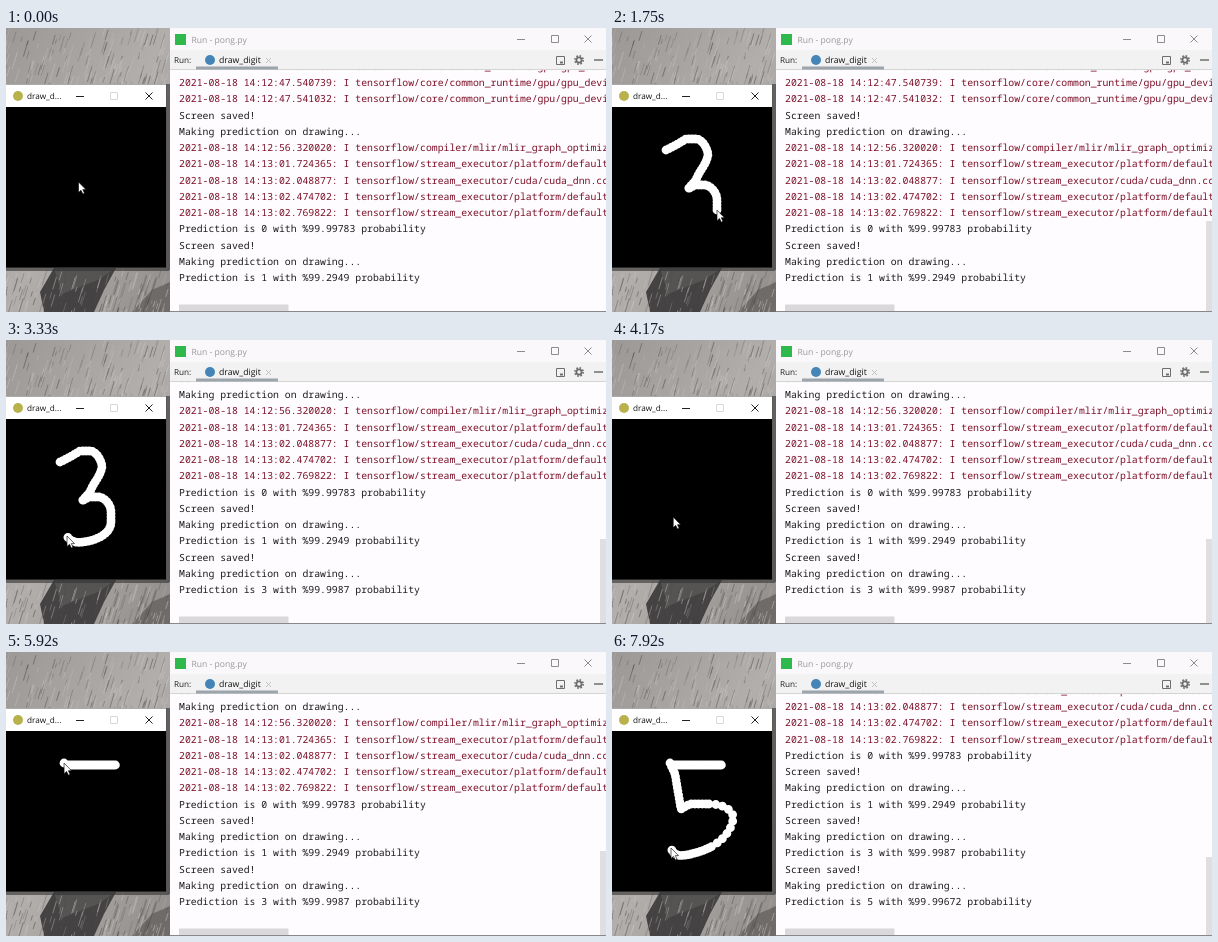
An HTML page for the animation above (8 s loop, 600 px wide and 284 px high).

```html
<!DOCTYPE html>
<html lang="en">
<head>
<meta charset="utf-8">
<title>Digit drawing demo</title>
<style>
  html, body { margin: 0; width: 100%; height: 100%; overflow: hidden; background: #fff; }
  svg { display: block; width: 100vw; height: 100vh; text-rendering: geometricPrecision; }
  text { font-family: "Open Sans", sans-serif; white-space: pre; }
  #log text { font: 500 9.8px "Noto Sans Mono", monospace; fill: #1c1c1c; }
  #log .warn { fill: #7c1028; }
  .line { fill: none; stroke: #222; }
</style>
</head>
<body>
<svg viewBox="0 0 600 284">
  <defs>
    <linearGradient id="rock" x2="1" y2="1">
      <stop offset="0" stop-color="#9c9896"/>
      <stop offset=".5" stop-color="#b2aeab"/>
      <stop offset="1" stop-color="#8f8c8a"/>
    </linearGradient>
    <clipPath id="console"><rect x="164" y="42" width="436" height="216"/></clipPath>
    <clipPath id="board"><rect y="79" width="160" height="160"/></clipPath>
  </defs>

  <!-- desktop -->
  <rect width="165" height="284" fill="url(#rock)"/>
  <path d="M38 284L34 264L48 240H110L98 262L88 284Z" fill="#444242"/>
  <path d="M48 240H110L92 252L56 266Z" fill="#565453"/>
  <path d="M126 284L146 262L164 254V284Z" fill="#6e6b69"/>
  <g id="streaks" stroke-width="1"></g>
  <path d="M0 240H163V243H0ZM160 56H164V242H160Z" fill="#333" opacity=".6"/>

  <!-- drawing window -->
  <rect y="56" width="160.500" height="184" fill="#555"/>
  <rect y="56.500" width="160" height="23" fill="#fff"/>
  <rect y="79" width="160" height="160.500" fill="#000"/>
  <circle cx="12" cy="68" r="5" fill="#b9b24c"/>
  <text x="21" y="71" font-size="8.200" fill="#111">draw_d...</text>
  <path class="line" d="M70 68.500H78M139.500 64.500L146.500 71.500M146.500 64.500L139.500 71.500"/>
  <path class="line" d="M104.500 64.500H111.500V71.500H104.500Z" style="stroke:#d8d8d8"/>
  <g clip-path="url(#board)">
    <path id="ink" fill="none" stroke="#fff" stroke-width="8.800" stroke-linecap="round"/>
  </g>

  <!-- run window -->
  <rect x="164" width="436" height="284" fill="#fefcfe"/>
  <rect x="164" width="436" height="22" fill="#faf8fa"/>
  <rect x="164" y="22" width="436" height="19" fill="#f2f2f2"/>
  <path d="M164 41.500H600" stroke="#d4d4d4"/>
  <path d="M164 283.500H600" stroke="#888"/>
  <rect x="169" y="6" width="11" height="11" fill="#2fb84c"/>
  <text x="185.500" y="14.500" font-size="8.600" fill="#999">Run - pong.py</text>
  <path class="line" d="M511 11.500H519M545.500 7.500H552.500V14.500H545.500ZM578.500 7.500L585.500 14.500M585.500 7.500L578.500 14.500" style="stroke:#8c8c8c"/>
  <text x="168" y="35" font-size="8.200" fill="#222">Run:</text>
  <circle cx="204" cy="32" r="5" fill="#4584b6"/>
  <text x="213" y="35" font-size="8.700" fill="#111">draw_digit</text>
  <path class="line" d="M260 30L265 35M265 30L260 35" style="stroke:#c0c0c0"/>
  <rect x="190" y="38.500" width="82" height="3" fill="#9ca4ac"/>
  <g fill="none" stroke="#6e6e6e">
    <path d="M550.500 28.500H558.500V36.500H550.500Z"/>
    <path d="M554 34.500H557" stroke-width="2"/>
    <circle cx="573" cy="32" r="2.600" stroke-width="1.800"/>
    <circle cx="573" cy="32" r="4.200" stroke-dasharray="1.700 1.600" stroke-width="1.500"/>
    <path d="M588 32H597" stroke-width="1.500"/>
  </g>
  <g clip-path="url(#console)"><g id="log"></g></g>
  <rect x="173" y="276.500" width="109.500" height="6.500" fill="#dad8da"/>
  <rect id="thumb" x="594" width="6" fill="#e0dee0"/>

  <path id="pointer" d="M0 0V10.500L2.500 8.300L4.300 12L6 11.200L4.300 7.600H7.500Z" fill="#fff" stroke="#000" stroke-width=".6"/>
</svg>
<script>
const LOOP = 8000, LINE = 16.25, LAST_BASELINE = 253, TICK = 24, CLEAR_AT = 3670, THUMB_AT = 900;
const $ = id => document.getElementById(id);

function add(parent, tag, attrs, text = '') {
  const el = document.createElementNS('http://www.w3.org/2000/svg', tag);
  for (const key in attrs) el.setAttribute(key, attrs[key]);
  el.textContent = text;
  parent.append(el);
  return el;
}

// Console output; a leading "!" marks a warning line.
const device = 'core/common_runtime/gpu/gpu_device.cc';
const loader = 'stream_executor/platform/default/dso_loader.cc';
const warn = (time, file) => `!2021-08-18 14:${time}: I tensorflow/${file}`;
const result = (digit, score) =>
  ['Screen saved!', 'Making prediction on drawing...', `Prediction is ${digit} with %${score} probability`];
const lines = [
  warn('12:47.540439', device),
  warn('12:47.540739', device),
  warn('12:47.541032', device),
  'Screen saved!',
  'Making prediction on drawing...',
  warn('12:56.320020', 'compiler/mlir/mlir_graph_optimization_pass.cc'),
  warn('13:01.724365', loader),
  warn('13:02.048877', 'stream_executor/cuda/cuda_dnn.cc'),
  warn('13:02.474702', loader),
  warn('13:02.769822', loader),
  result(0, '99.99783')[2],
  ...result(1, '99.2949'),
  ...result(3, '99.9987'),
  ...result(5, '99.99672')
];
const START_LINES = 14;
lines.forEach((line, i) => {
  const isWarning = line[0] === '!';
  add($('log'), 'text', {
    x: 173, y: LAST_BASELINE + (i - START_LINES + 1) * LINE, class: isWarning ? 'warn' : 'out'
  }, isWarning ? line.slice(1) : line);
});

// [time, lines printed since the start]
const prints = [[0, 0], [2750, 2], [2920, 3], [7580, 5], [7750, 6]];

// Rock texture: steep seeded streaks above and below the drawing window.
let seed = 7;
const random = () => (seed = seed * 16807 % 2147483647) / 2147483647;
for (let i = 0; i < 320; i++) {
  const top = i % 2 ? 0 : 240, height = i % 2 ? 56 : 44;
  const x = random() * 170 - 5, y = top + random() * height, len = 4 + random() * 14;
  add($('streaks'), 'path', {
    d: `M${x} ${y}l${-len * .3} ${len}`,
    stroke: random() < .5 ? '#4e4b4a' : '#cbc7c4',
    opacity: .2 + random() * .35
  });
}

// Pointer travel: [from, to, path, pen down]
const moves = [
  [80, 680, 'M72.500 154L54 122', 0],
  [680, 1750, 'M54 122L64 117L74 111H85C90 112 95 119 96 126C95 136 87 143 84 152L76 161L83 157H94C100 159 105 165 105 172V182', 1],
  [1750, 2170, 'M105 182C105 193 92 199 83 201C74 203 66 204 61 196', 1],
  [4000, 4750, 'M61 196L62 113', 0],
  [4830, 5500, 'M62 113L111 113', 1],
  [5580, 5920, 'M111 113L58 110', 0],
  [5920, 6420, 'M58 111L63 122L69 157L78 152L97 152', 1],
  [6420, 6670, 'M97 152C112 152 123 159 121 168C118 182 108 190 97 196', 1],
  [6670, 7000, 'M97 196C88 200 72 205 66 203C62 202 60 199 59 196', 1]
].map(([from, to, d, down]) => {
  const path = document.createElementNS('http://www.w3.org/2000/svg', 'path');
  path.setAttribute('d', d);
  const length = path.getTotalLength();
  const at = t => path.getPointAtLength(length * Math.min(1, Math.max(0, (t - from) / (to - from))));
  return { from, to, down, at };
});

// The pen leaves one round dot per tick.
const dots = [];
for (const { from, to, down, at } of moves) {
  for (let t = from; down && t <= to; t += TICK) {
    const p = at(t);
    dots.push({ t, d: `M${p.x.toFixed(1)} ${p.y.toFixed(1)}h.01` });
  }
}

const latest = (list, test) => list.filter(test).pop();

function render(t) {
  const p = (latest(moves, m => m.from <= t) || moves[0]).at(t);
  $('pointer').setAttribute('transform', `translate(${p.x} ${p.y})`);

  const since = t < CLEAR_AT ? 0 : CLEAR_AT;
  $('ink').setAttribute('d', dots.filter(dot => dot.t >= since && dot.t <= t).map(dot => dot.d).join('') || 'M0 0');

  const printed = latest(prints, ([time]) => time <= t)[1];
  $('log').setAttribute('transform', `translate(0 ${-printed * LINE})`);

  const thumbY = 193 + printed * 2;
  $('thumb').setAttribute('y', thumbY);
  $('thumb').setAttribute('height', 283 - thumbY);
  $('thumb').setAttribute('opacity', t < THUMB_AT ? 0 : 1);
}

const start = performance.now();
function frame() {
  render((performance.now() - start) % LOOP);
  requestAnimationFrame(frame);
}
frame();
</script>
</body>
</html>
```
